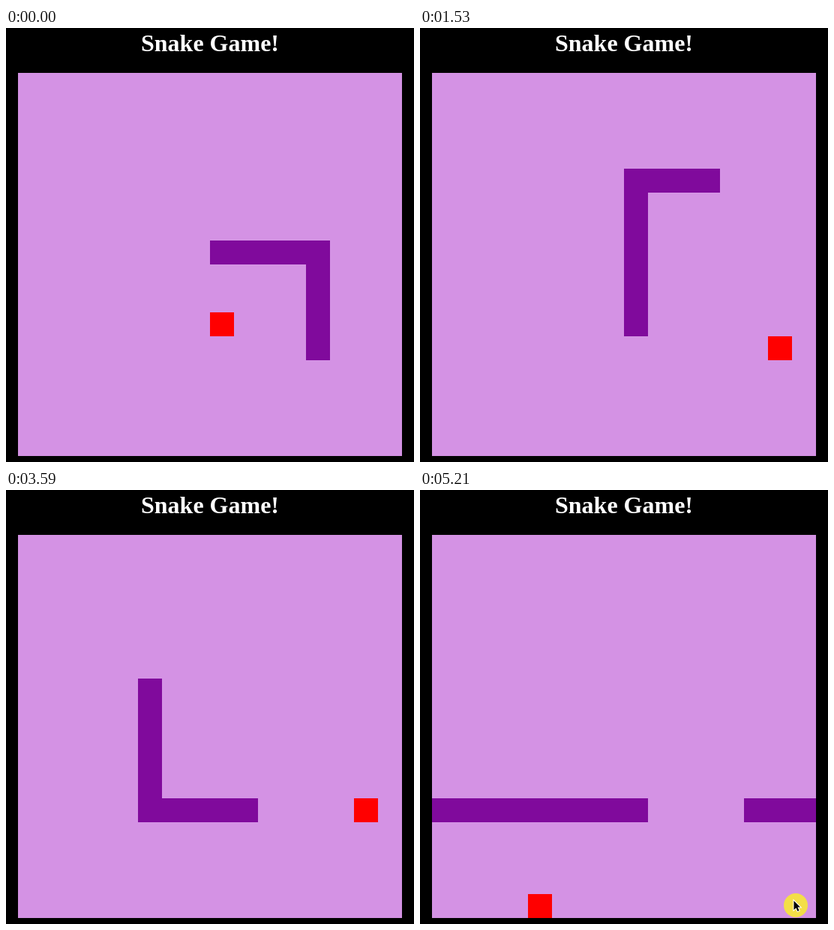
An HTML page with a canvas for the animation above (5.28 s loop, 544x580 px).

```html
<!DOCTYPE html>
<html lang="en">
<head>
<meta charset="utf-8">
<title>Snake Game!</title>
<style>
  html, body { margin: 0; width: 100%; height: 100%; overflow: hidden; background: #000; }
  canvas { display: block; }
</style>
</head>
<body>
<canvas id="stage" width="544" height="580"></canvas>
<script>
const ctx = document.getElementById('stage').getContext('2d');
const LOOP = 5280, FPS = 15, FRAME_LEAD = 21;
const CELL = 32, SIZE = 16, LEFT = 16, TOP = 60;
const START_LENGTH = 9;

// The game ticks about twice in every three screen frames.
const STEPS_PER_FRAME = 2 / 3 + 0.005, FIRST_STEP = 0.8425;

const directions = { R: [1, 0], L: [-1, 0], U: [0, -1], D: [0, 1] };
const foods = [{ x: 8, y: 10 }, { x: 14, y: 11 }, { x: 6, y: 11 }, { x: 4, y: 15 }];
const pointer = { x: 501, y: 555, arrival: 78, dx: 33, dy: -2 };

function buildPath(x, y, runs) {
  const path = [{ x, y }];
  for (const run of runs.split(' ')) {
    const [dx, dy] = directions[run[0]];
    for (let i = Number(run.slice(1)); i > 0; i--) {
      x = (x + dx + SIZE) % SIZE;
      y = (y + dy + SIZE) % SIZE;
      path.push({ x, y });
    }
  }
  return path;
}

const path = buildPath(8, 7, 'R4 D5 L4 U8 R13 D7 R19');
const lastStep = path.length - START_LENGTH;

function countEaten(headEnd) {
  let eaten = 0;
  for (const cell of path.slice(START_LENGTH, headEnd)) {
    if (cell.x === foods[eaten].x && cell.y === foods[eaten].y) eaten++;
  }
  return eaten;
}

function drawCell({ x, y }, color) {
  ctx.fillStyle = color;
  ctx.fillRect(LEFT + x * CELL, TOP + y * CELL, CELL, CELL);
}

function drawPointer(x, y) {
  ctx.fillStyle = '#f3de48';
  ctx.beginPath();
  ctx.arc(x, y, 16, 0, Math.PI * 2);
  ctx.fill();

  const outline = [[0, 0], [0, 12], [3, 9.5], [5, 14], [7, 13], [5, 8.5], [8.5, 8.5]];
  ctx.beginPath();
  for (const [px, py] of outline) ctx.lineTo(x - 2.5 + px, y - 6 + py);
  ctx.closePath();
  ctx.lineWidth = 2;
  ctx.strokeStyle = '#fff';
  ctx.stroke();
  ctx.fillStyle = '#000';
  ctx.fill();
}

function draw(time) {
  const frame = Math.floor((time + FRAME_LEAD) * FPS / 1000);
  const step = Math.min(lastStep, Math.floor(frame * STEPS_PER_FRAME + FIRST_STEP));
  const headEnd = START_LENGTH + step;
  const eaten = countEaten(headEnd);

  ctx.fillStyle = '#000';
  ctx.fillRect(0, 0, 544, 580);
  ctx.fillStyle = '#fff';
  ctx.font = 'bold 32px "Liberation Serif", "Times New Roman", serif';
  ctx.fillText('Snake Game!', 180, 31);

  ctx.fillStyle = '#d492e4';
  ctx.fillRect(LEFT, TOP, SIZE * CELL, SIZE * CELL);
  for (const cell of path.slice(step - eaten, headEnd)) drawCell(cell, '#800a9c');
  drawCell(foods[eaten], '#f00');

  const framesAway = Math.max(0, pointer.arrival - frame);
  if (framesAway < 2) {
    drawPointer(pointer.x + pointer.dx * framesAway, pointer.y + pointer.dy * framesAway);
  }
}

const begin = performance.now();
function tick() {
  draw((performance.now() - begin) % LOOP);
  requestAnimationFrame(tick);
}
tick();
</script>
</body>
</html>
```
